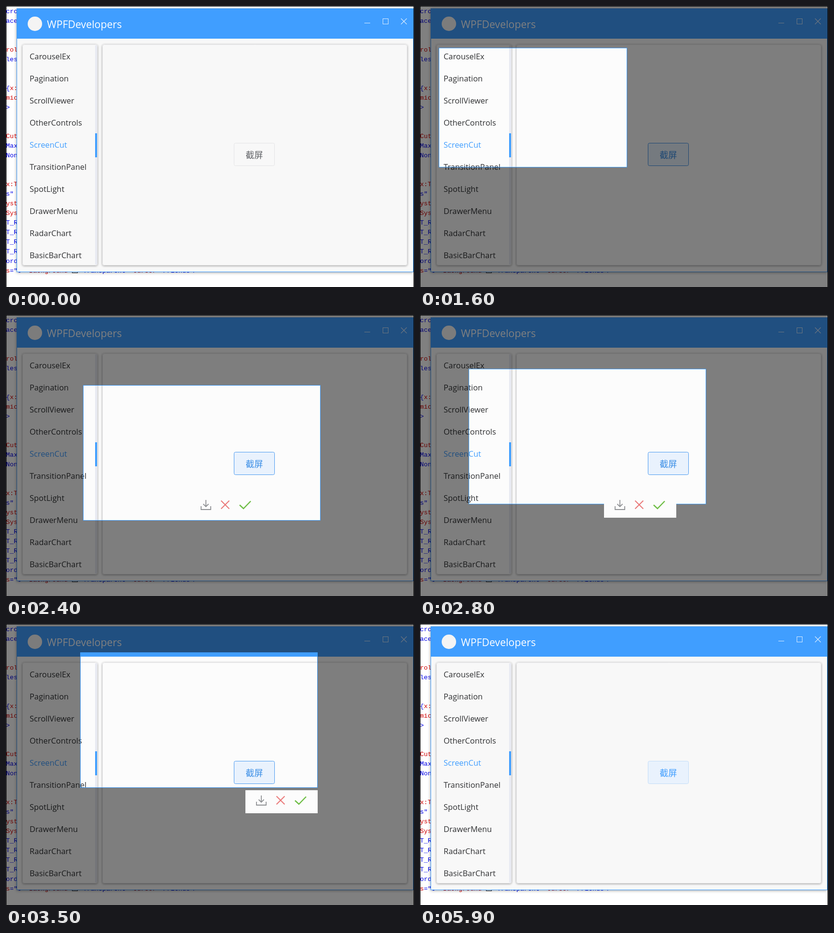
These frames come from a looping animation (847x585 px, 6000 ms). An HTML page with a canvas:

```html
<!DOCTYPE html>
<html lang="zh">
<head>
<meta charset="utf-8">
<title>ScreenCut</title>
<style>
html, body { margin: 0; width: 100%; height: 100%; overflow: hidden; background: #fff; }
canvas { display: block; }
</style>
</head>
<body>
<canvas id="stage" width="847" height="585"></canvas>
<script>
const ctx = document.getElementById('stage').getContext('2d');
const LOOP = 6000;
const UI = '"Open Sans", "Noto Sans", sans-serif';
const CJK = '"Noto Sans CJK SC", "Noto Sans CJK", sans-serif';
const CODE = '13.33px "Liberation Mono", monospace';

const normal = {
  page: '#ffffff', bg: '#f8f8f8', head: '#409eff', title: '#ffffff', ctrl: '#d9ecff', logo: '#f4f4f4',
  text: '#303133', accent: '#409eff', track: '#e8eaf2', edge: '#e6e6e8', shadow: 'rgba(0,0,0,.38)',
  red: '#d00000', blue: '#0000e8', ink: '#202020'
};
const picked = { ...normal, page: '#fcfcfc', bg: '#fcfcfc' };
// The overlay halves every colour
const dimmed = {
  page: '#808080', bg: '#7e7e7e', head: '#204f80', title: '#808080', ctrl: '#6c767f', logo: '#7c7c7c',
  text: '#18191a', accent: '#204f80', track: '#747579', edge: '#737374', shadow: 'rgba(0,0,0,.38)',
  red: '#680000', blue: '#000074', ink: '#101010'
};

// Button looks: fill, border, label
const buttons = {
  idle: ['#f8f8f8', '#e4e4e6', '#606266'],
  half: ['#f1f5fb', '#cfe0f4', '#5082b4'],
  hover: ['#e9f2fd', '#c2dcf8', '#409eff'],
  pressed: ['#e9f2fd', '#4a9af0', '#3a8ee6'],
  dim: ['#757a7f', '#1d4773', '#1d4773']
};

const menu = ['CarouselEx', 'Pagination', 'ScrollViewer', 'OtherControls', 'ScreenCut',
  'TransitionPanel', 'SpotLight', 'DrawerMenu', 'RadarChart', 'BasicBarChart'];

// Code behind the window: row, colour, text, optional x
const code = [
  [0, 'blue', 'crosoft.com/winfx/2006/xaml"'], [1, 'blue', 'ace'], [4, 'red', 'rol'], [5, 'blue', 'les'],
  [8, 'blue', '{'], [8, 'red', 'x:', 8], [9, 'red', 'mic'], [10, 'blue', '>'],
  [13, 'red', 'Cut'], [14, 'blue', 'Max'], [15, 'blue', 'Non'], [18, 'red', 'x:T'], [19, 'blue', 's"'],
  [20, 'red', 'yst'], [21, 'red', 'Sys'],
  [22, 'blue', 'T_R'], [23, 'blue', 'T_R'], [24, 'blue', 'T_R'], [25, 'blue', 'T_R'],
  [26, 'blue', 'ord'], [27, 'red', 's'], [27, 'blue', '="0"', 8], [27, 'red', 'Background', 48],
  [27, 'blue', 'Transparent"', 160], [27, 'red', 'Cursor', 264], [27, 'blue', '"Friends"', 318],
  [27, 'blue', '/', 388], [29, 'blue', 'D_MenuCount"']
];

// Selection: time, x, y, width, height
const W = 493, H = 282;
const drag = [
  [1400, 39, 87, 40, 32], [1500, 39, 87, 190, 150], [1600, 39, 87, 391, 249], [1700, 39, 87, 442, 260],
  [1800, 39, 87], [2100, 14, 52], [2200, 1, 36], [2300, 165, 62], [2400, 160, 146],
  [2500, 165, 158], [2600, 90, 39], [2700, 1, 84], [2800, 101, 112], [2900, 165, 156],
  [3000, 120, 110], [3100, 93, 39], [3200, 130, 48], [3300, 165, 66], [3500, 154, 59]
];

function fill(color, x, y, w, h) {
  ctx.fillStyle = color;
  ctx.fillRect(x, y, w, h);
}

function label(s, x, y, font, color) {
  ctx.font = font;
  ctx.fillStyle = color;
  ctx.fillText(s, x, y);
}

function line(color, width, ...pts) {
  ctx.strokeStyle = color;
  ctx.lineWidth = width;
  ctx.beginPath();
  for (let i = 0; i < pts.length; i += 2) ctx.lineTo(pts[i], pts[i + 1]);
  ctx.stroke();
}

function card(x, y, w, h, p) {
  ctx.save();
  ctx.shadowColor = p.shadow;
  ctx.shadowBlur = 4;
  ctx.shadowOffsetY = 1;
  ctx.fillStyle = p.bg;
  ctx.beginPath();
  ctx.roundRect(x, y, w, h, 4);
  ctx.fill();
  ctx.restore();
  ctx.strokeStyle = p.edge;
  ctx.lineWidth = 1;
  ctx.beginPath();
  ctx.roundRect(x + .5, y + .5, w - 1, h - 1, 4);
  ctx.stroke();
}

function button(look) {
  const [bg, edge, ink] = buttons[look];
  ctx.beginPath();
  ctx.roundRect(473.5, 285.5, 84, 47, 3);
  ctx.fillStyle = bg;
  ctx.fill();
  ctx.strokeStyle = edge;
  ctx.lineWidth = 1;
  ctx.stroke();
  label('截屏', 497.5, 316.5, '18px ' + CJK, ink);
}

function scene(p, look) {
  fill(p.page, 0, 0, 847, 585);
  for (const [row, color, s, x = 0] of code) label(s, x, 14.5 + row * 20, CODE, p[color]);
  ctx.strokeStyle = p.ink;
  ctx.lineWidth = 1;
  ctx.strokeRect(137.5, 545.5, 11, 10);

  ctx.save();
  ctx.shadowColor = p.shadow;
  ctx.shadowBlur = 6;
  ctx.shadowOffsetY = 1;
  fill(p.bg, 22, 5, 823, 549);
  ctx.restore();
  ctx.strokeStyle = p.accent;
  ctx.strokeRect(22.5, 5.5, 823, 548);
  fill(p.head, 22, 5, 824, 63);

  ctx.fillStyle = p.logo;
  ctx.beginPath();
  ctx.arc(60, 37, 15, 0, Math.PI * 2);
  ctx.fill();
  label('WPFDevelopers', 85, 46, '21.3px ' + UI, p.title);
  line(p.ctrl, 1, 744, 35.5, 756, 35.5);
  ctx.strokeRect(782.5, 26.5, 11, 11);
  line(p.ctrl, 1.1, 820, 26, 832, 38);
  line(p.ctrl, 1.1, 832, 26, 820, 38);

  card(34, 80, 156, 460, p);
  card(200, 80, 633, 460, p);
  fill(p.track, 185, 82, 4, 456);
  fill(p.accent, 185, 265, 4, 50);
  menu.forEach((s, i) =>
    label(s, 49, 111 + i * 46, '16.4px ' + UI, i === 4 ? p.accent : p.text));
  button(look);

  fill('#000', 0, 0, 847, 1);
  fill('#000', 0, 0, 1, 585);
  fill('#000', 846, 0, 1, 585);
}

function toolbar(x, y, hot) {
  ctx.save();
  ctx.translate(x, y);
  fill('#fcfcfc', 0, 0, 150, 48);
  const grey = '#8f9194', red = hot ? '#e8504e' : '#ea7b7b';
  line(grey, 1.8, 33, 11, 33, 25);
  line(grey, 1.8, 27.5, 19.5, 33, 25, 38.5, 19.5);
  line(grey, 1.8, 23, 24, 23, 31, 43, 31, 43, 24);
  line(red, 2.1, 64.5, 12.5, 81.5, 29.5);
  line(red, 2.1, 81.5, 12.5, 64.5, 29.5);
  line('#70be48', 2.5, 103, 21.5, 111, 29, 126, 13.5);
  ctx.restore();
}

function tooltip(alpha) {
  ctx.save();
  ctx.globalAlpha = alpha;
  fill('#dedfe3', 551, 389, 48, 32);
  ctx.strokeStyle = '#8a8a8e';
  ctx.lineWidth = 1;
  ctx.strokeRect(551.5, 389.5, 47, 31);
  label('取消', 559, 410, '15px ' + CJK, '#55565a');
  ctx.restore();
}

function draw(t) {
  if (t < 700 || t >= 5200) {
    scene(normal, t >= 5200 ? 'hover' : t < 400 ? 'idle' : t < 500 ? 'half' : t < 600 ? 'hover' : 'pressed');
    return;
  }
  scene(dimmed, 'dim');
  const step = drag.filter(k => k[0] <= t).pop();
  if (!step) return;

  const [, x, y, w = W, h = H] = step;
  ctx.save();
  ctx.beginPath();
  ctx.rect(x, y, w, h);
  ctx.clip();
  scene(picked, 'pressed');
  ctx.restore();
  ctx.strokeStyle = '#409eff';
  ctx.lineWidth = 1;
  ctx.strokeRect(x + .5, y + .5, w - 1, h - 1);
  if (t < 1800) return;

  // The toolbar follows only once the drag is released
  if (t < 3500) toolbar(382, 374, false);
  else toolbar(497, 346, t >= 3900);
  if (t >= 4300) tooltip(Math.min(1, (Math.floor((t - 4300) / 100) + 1) / 4));
}

const start = performance.now();
function tick() {
  draw((performance.now() - start) % LOOP);
  requestAnimationFrame(tick);
}
tick();
</script>
</body>
</html>
```
